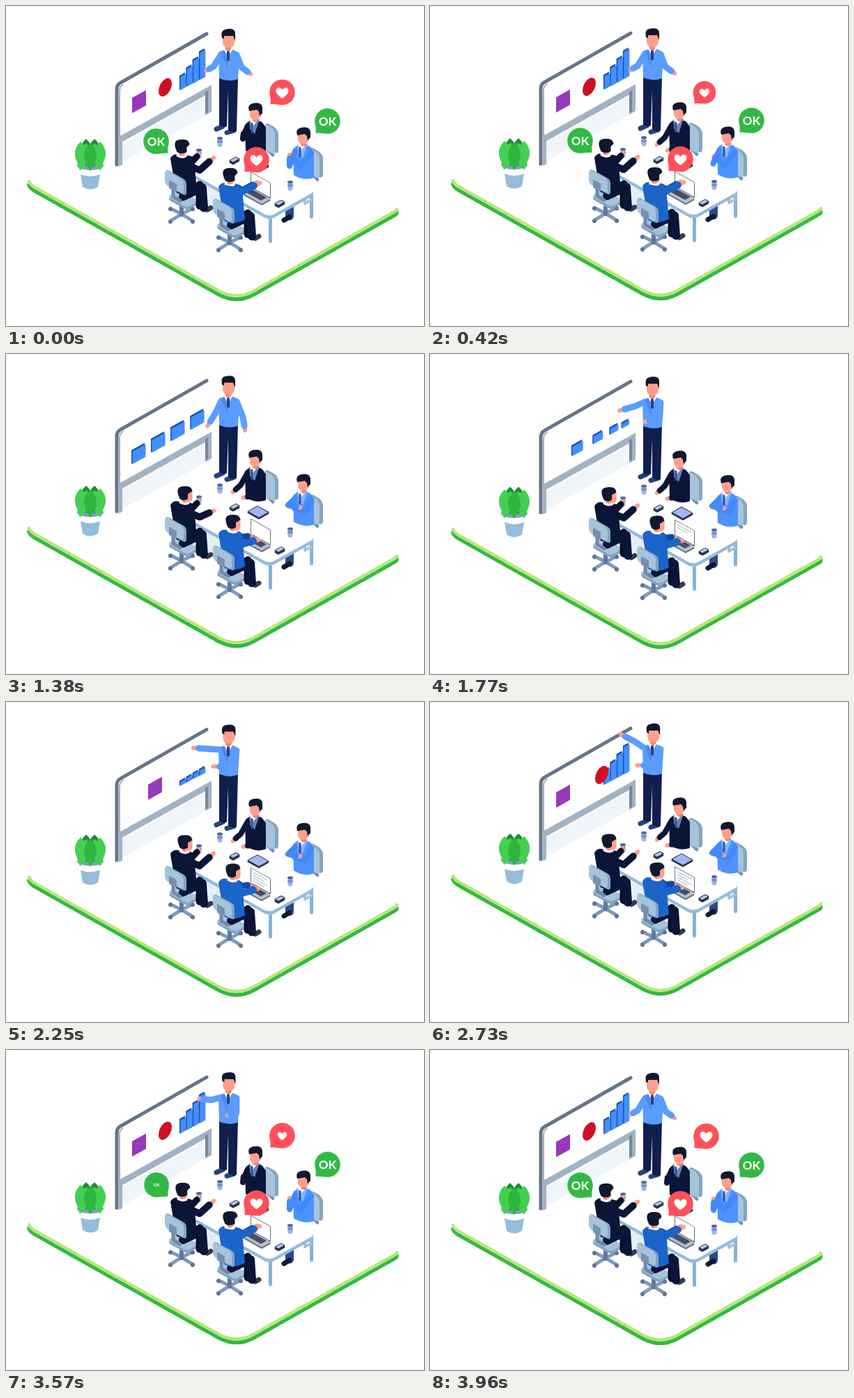
Write an HTML page with a canvas that moves like this. It is 600 by 460 pixels and loops after 3990 ms.

```html
<!DOCTYPE html>
<html lang="en">
<head>
<meta charset="utf-8">
<title>Team meeting</title>
<style>
html, body { margin: 0; width: 100%; height: 100%; overflow: hidden; background: #fff; }
canvas { display: block; }
</style>
</head>
<body>
<canvas id="stage" width="600" height="460"></canvas>
<script>
const c = document.getElementById('stage').getContext('2d');
const LOOP = 3990;
const SKIN = '#ff9f8c', HAIR = '#10182f', NAVY = '#0b1538', SKY = '#5b9cff';
const STEEL = '#a6c3da', STEEL_DARK = '#84a5c2', LEG = '#84b3d9', LEAF = '#43d051';
const GREEN = '#32b944', RED = '#ff5059', INK = '#29344f';
c.lineCap = c.lineJoin = 'round';

// Isometric planes: walls that rise or fall to the right, and flat ground.
const K = .56;
const RISE = [1, -K, 0, 1], FALL = [1, K, 0, 1], FLAT = [1, -K, 1, K];

// Smooth 0 to 1 step, and its use as "active between two times".
function ramp(t, start, span = 400) {
  const u = Math.min(1, Math.max(0, (t - start) / span));
  return u * u * (3 - 2 * u);
}
const hold = (t, from, to, span) => ramp(t, from, span) - ramp(t, to, span);
const lerp = (a, b, k) => a + (b - a) * k;
const mix = (a, b, k) => a.map((v, i) => lerp(v, b[i], k));

function place(x, y, draw) {
  c.save();
  c.translate(x, y);
  draw();
  c.restore();
}

function fill(d, color) {
  c.fillStyle = color;
  c.fill(new Path2D(d));
}

function line(d, color, w) {
  c.strokeStyle = color;
  c.lineWidth = w;
  c.stroke(new Path2D(d));
}

function oval(x, y, rx, ry, color, turn = 0) {
  c.fillStyle = color;
  c.beginPath();
  c.ellipse(x, y, rx, ry, turn, 0, 7);
  c.fill();
}

// Rectangle lying in an isometric plane, starting at its left corner.
function panel(plane, x, y, w, h, color, r = 0) {
  place(x, y, () => {
    c.transform(...plane, 0, 0);
    c.fillStyle = color;
    c.beginPath();
    c.roundRect(0, 0, w, h, r);
    c.fill();
  });
}

// Flat plate with a visible lower edge.
function plate(x, y, w, h, thick, color, edge, r) {
  for (let i = thick; i > 0; i--) panel(FLAT, x, y + i, w, h, edge, r);
  panel(FLAT, x, y, w, h, color, r);
}

// Sleeve from the shoulder over the elbow to the wrist, then a hand.
function arm(sx, sy, [ex, ey, hx, hy], color, w) {
  const wx = lerp(ex, hx, .72), wy = lerp(ey, hy, .72);
  line(`M${wx} ${wy}L${hx} ${hy}`, SKIN, w / 2);
  oval(hx, hy, 4.6, 3.2, SKIN, Math.atan2(hy - ey, hx - ex));
  line(`M${sx} ${sy}L${ex} ${ey}L${wx} ${wy}`, color, w);
}

function ground() {
  const rim = 'M33 252Q34 256 40 260L306 410Q331 423 355 410L557 296Q561 294 561 292';
  place(0, 5, () => line(rim, '#33b941', 5.5));
  line(rim, '#b5e77c', 4.5);
}

function plant() {
  fill('M107 242Q121 248 135 242L132 260Q121 267 110 260Z', '#93bddb');
  oval(121, 229, 19, 7, '#7f9fc4');
  const leaf = (x, y, turn, color) => place(x, y, () => {
    c.rotate(turn);
    fill('M0 -20Q18 -4 0 20Q-18 -4 0 -20Z', color);
  });
  for (const side of [-1, 1]) {
    leaf(121 + side * 6, 211, 0, '#1c8d2f');
    leaf(121 + side * 13, 215, side * .06, LEAF);
    leaf(121 + side * 10, 217, side * -.25, LEAF);
  }
  leaf(121, 217, 0, '#2fb640');
}

function board() {
  panel(RISE, 162, 188, 133, 10, '#a1b2c3');
  panel(RISE, 166, 198, 120, 27, '#f0f5f9');
  panel(RISE, 162, 188, 5, 43, '#a1b2c3');
  panel(RISE, 286, 120, 9, 37, '#a1b2c3');
  panel(RISE, 286, 124, 4, 31, '#76879b');
  line('M159 228V120Q159 113 165 110L288 40', '#667487', 5);
  line('M163 227V122Q163 116 168 113', '#a1b2c3', 2);
}

// Four cards grow, slide to the right edge and become the bars of a chart.
function chart(t) {
  for (let i = 0; i < 4; i++) {
    const tall = 19 + 6.7 * i, first = t < 720;
    const slide = first ? 1 : ramp(t, 1540 - 70 * i, 600);
    const grown = 18 * ramp(t, 910 - 60 * i);
    const x = lerp(181 + 28 * i, 250 + 9.3 * i, slide);
    const y = lerp(160 - 16.5 * i, 121 - 4.9 * i, slide);
    const w = lerp(19, 8, slide);
    const h = first ? tall * (1 - ramp(t, 450, 250)) : lerp(grown, lerp(4, tall, ramp(t, 2150, 500)), slide);
    if (h < .1) continue;
    panel(RISE, x - 1, y - h - 2, w, h + 2, '#1751b5');
    panel(RISE, x + .5, y - h, w, h, '#448fff');
  }
}

function badges(t) {
  const show = (x, y, leave, back, draw) => {
    const s = 1 - hold(t, leave, back, 250), slide = t < back ? 0 : 1 - ramp(t, back + 200);
    place(x + 24 * slide, y - 13.5 * slide, () => {
      c.transform(s, -K * s, 0, s, 0, 0);
      draw();
    });
  };
  show(191, 137.5, 500, 2000, () => {
    c.fillStyle = '#9838bd';
    c.fillRect(-10, -11, 20, 22);
  });
  show(228.5, 117, 540, 2400, () => oval(0, 0, 9.5, 12, '#cf1024'));
}

function presenter(t) {
  const relaxed = hold(t, 450, 2800), showing = hold(t, 1500, 3400);
  const wave = Math.sin(Math.PI * (t - 1770) / 560) ** 2;
  const point = mix([292, 72, 268, 74], [294, 50, 280, 33], wave);
  const left = mix(mix([298, 87, 289, 92], [301, 86, 290, 104], relaxed), point, showing);
  const right = mix(mix([338, 88, 350, 97], [340, 92, 343, 110], relaxed), [326, 94, 299, 93], showing);

  line('M302 177L311 173', '#26427f', 7);
  line('M317 182L327 179', '#26427f', 7);
  fill('M306 102H333L331 180Q324 183 319 178V122L317 173Q311 176 306 171Z', '#101f4d');
  arm(309, 69, left, SKY, 9);
  fill('M305 69Q308 64 314 63H326Q334 65 335 74L333 105Q320 110 306 104Z', SKY);
  fill('M309 67L318 90V82L314 64Z', '#4b89eb');
  fill('M312 61H326L319 73Z', '#fff');
  line('M319 66V77', '#283f83', 4);
  arm(331, 70, right, SKY, 9);
  place(2 * showing * wave, 0, () => {
    line('M319 56V60', '#f2897a', 9);
    fill('M311 42H328V53Q327 60 319 60Q312 60 311 53Z', SKIN);
    fill('M310 46Q308 35 314 34Q329 30 329 40V50L326 43H313V47Z', HAIR);
  });
}

// Colleague on the far side of the table, without arms.
function farBody(x, y, coat, lapel, seat) {
  place(x, y, () => {
    place(seat, 0, () => {
      line('M374 205L383 214', '#7892b0', 5);
      panel(FALL, 371, 166, 20, 37, STEEL_DARK, 7);
      panel(FALL, 369, 168, 17, 37, STEEL, 7);
    });
    fill('M343 171Q347 165 355 164L366 166Q373 171 373 182V212Q359 217 344 208Z', coat);
    fill('M349 163H364L357 184L350 177Z', lapel);
    fill('M349 162L362 164L354 173Z', '#fff');
    line('M353 169V181', '#34558f', 3);
    line('M358 158V163', '#ef8677', 8);
    fill('M350 147H366V158Q362 164 355 164Q350 161 350 156Z', SKIN);
    fill('M349 151Q346 142 354 140Q367 137 368 146V154L364 158L363 152L360 149Z', HAIR);
  });
}

function farArms(x, y, coat, left, right) {
  place(x, y, () => {
    arm(369, 176, right, coat, 8);
    arm(346, 174, left, coat, 8);
  });
}

function chairSeat() {
  for (const dx of [-16, 16])
    for (const y of [291, 309]) {
      line(`M252 299L${252 + dx} ${y}`, '#7f9abb', 5);
      oval(252 + dx, y + 1, 3, 3, '#5d7398');
    }
  line('M252 284V300', '#5d789f', 6);
  plate(232, 274, 17, 28, 4, STEEL, STEEL_DARK, 4);
}

function chairBack() {
  panel(FALL, 229, 234, 30, 23, STEEL_DARK, 5);
  panel(FALL, 228, 235, 27, 21, STEEL, 5);
  line('M240 258V274L250 280', '#7089ab', 5);
  panel(FALL, 234, 250, 11, 12, '#7690b4');
}

// Colleague on the near side; turn goes from back view (0) to profile (1).
function nearMan(x, y, coat, shade, turn, near, far) {
  place(x, y, () => {
    chairSeat();
    line('M289 293L294 290', '#343b51', 7);
    line('M262 269L278 257V287', '#071029', 11);
    line('M254 274L282 261L284 290', NAVY, 12);
    arm(264, 220, far, shade, 9);
    fill('M236 219Q240 211 249 214L263 215Q272 220 271 232L274 266Q258 275 244 268Z', coat);
    place(4 * turn - 1.5, 0, () => {
      const face = 4 + 5 * turn;
      fill('M247 209H261V217Q254 221 246 216Z', '#fff');
      line('M254 205V211', '#ed8a7b', 9);
      fill(`M252 199H${256 + face}V210Q${255 + face} 215 256 215L251 210Z`, SKIN);
      fill(`M245 205Q241 193 251 192Q264 190 265 199L${263 - face / 2} 203V210Q253 214 247 210Z`, HAIR);
    });
    arm(243, 221, near, coat, 10);
    chairBack();
  });
}

function table() {
  panel(RISE, 290, 261, 19, 28, '#e5eef5');
  line('M379.5 304V338', LEG, 5);
  line('M438.5 272V303', LEG, 5);
  line('M429 276V284L438 279', STEEL, 4);
  plate(233, 222, 67, 145, 5, '#fff', '#94bbdc', 7);
}

function cup(x, y) {
  line(`M${x} ${y - 3}V${y + 4}`, '#98b5ef', 7);
  line(`M${x - 2} ${y}h4`, '#7a90cf', 4);
  oval(x, y - 5, 4, 2, '#52658e');
}

function phone(x, y) {
  plate(x - 8, y + 1, 10, 6, 3, INK, INK, 1);
  panel(FLAT, x - 6, y + 1, 8, 4, '#b3c8ee');
}

function desk(t) {
  plate(346, 228, 15, 17, 2, INK, INK, 1);
  c.globalAlpha = hold(t, 500, 2800, 250);
  panel(FLAT, 348, 228, 13, 15, '#a0b8f2');
  c.globalAlpha = 1;
  plate(339, 269, 13, 28, 2, '#b5bfca', '#5d6678', 1);
  panel(FLAT, 345, 268, 8, 21, '#454f65');
  panel(FALL, 351, 238, 29, 23, '#667080', 1);
  panel(FALL, 352, 239.5, 27, 20.5, '#fff');
  const rows = Math.floor(4 * hold(t, 1400, 2900, 700));
  for (let i = 0; i < rows; i++) panel(FALL, 355, 245 + i * 4, 20 - i % 2 * 5, 1, '#a3acb8');
  cup(307, 195);
  cup(408, 258);
  cup(277, 212);
  phone(328, 221);
  phone(393, 283);
}

// Pops out of its tail; side is where the tail points (-1 left, 1 right).
function bubble(t, x, y, side, color, ok, leave, back) {
  const s = 1 - hold(t, leave, back, 300);
  if (s < .02) return;
  place(x + side * 17, y + 17, () => {
    c.rotate(side * .4 * (1 - s));
    c.scale(s, s);
    c.translate(side * -17, -17);
    oval(0, 0, 18.3, 18.3, color);
    fill(`M${side * 18} 3Q${side * 16} 9 ${side * 17} 16Q${side * 17} 18 ${side * 14} 17L${side * 3} 18Z`, color);
    const mark = 1 - hold(t, leave, back + 150, 300);
    c.scale(mark, mark);
    if (ok) {
      c.fillStyle = '#fff';
      c.font = '700 17px Lato, Inter, sans-serif';
      c.textAlign = 'center';
      c.textBaseline = 'middle';
      c.fillText('OK', 0, 1);
    } else {
      fill('M0 9Q-9 3 -9 -2C-9 -8 -2 -8 0 -3C2 -8 9 -8 9 -2Q9 3 0 9Z', '#fff');
    }
  });
}

function scene(t) {
  c.clearRect(0, 0, 600, 460);
  const bob = -1.25 * (1 - Math.cos(4 * Math.PI * t / LOOP));
  place(0, bob, () => {
    ground();
    plant();
    board();
    chart(t);
    badges(t);
    presenter(t);

    const calm = hold(t, 20, 2880), folded = hold(t, 300, 2880);
    farBody(0, 0, NAVY, '#6585bd', 0);
    line('M407 280V302', '#2a4987', 12);
    line('M399 308L407 303', '#101a36', 7);
    farBody(69, 35, '#4d92ff', '#85b7ff', -5);
    table();
    farArms(0, 0, NAVY,
      mix([340, 191, 341, 181], [337, 190, 327, 199], calm),
      mix([357, 198, 343, 183], [360, 204, 342, 208], calm));
    farArms(69, 35, '#4389fa',
      mix([338, 195, 338, 180], [336, 184, 352, 187], folded),
      mix([353, 196, 340, 182], [360, 193, 339, 186], folded));
    desk(t);

    const reach = 15 * hold(t, 550, 1200);
    nearMan(0, 0, NAVY, '#071029', hold(t, 500, 3300), [278, 236, 297, 219 + reach], [269, 222, 276, 214]);
    const typing = hold(t, 480, 2850);
    nearMan(69, 41, '#1b64c9', '#0f4aa4', hold(t, 300, 2850),
      mix([269, 226, 294, 214], [271, 234, 292, 228], typing),
      mix([270, 224, 290, 213], [269, 224, 281, 222], typing));

    bubble(t, 215.5, 194.5, 1, GREEN, true, 500, 3300);
    bubble(t, 461.5, 165.5, -1, GREEN, true, 520, 2850);
    bubble(t, 396.5, 124, -1, RED, false, 360, 3220);
    bubble(t, 359.5, 221, -1, RED, false, 500, 2960);
  });
}

const start = performance.now();
function tick() {
  scene((performance.now() - start) % LOOP);
  requestAnimationFrame(tick);
}
tick();
</script>
</body>
</html>
```
